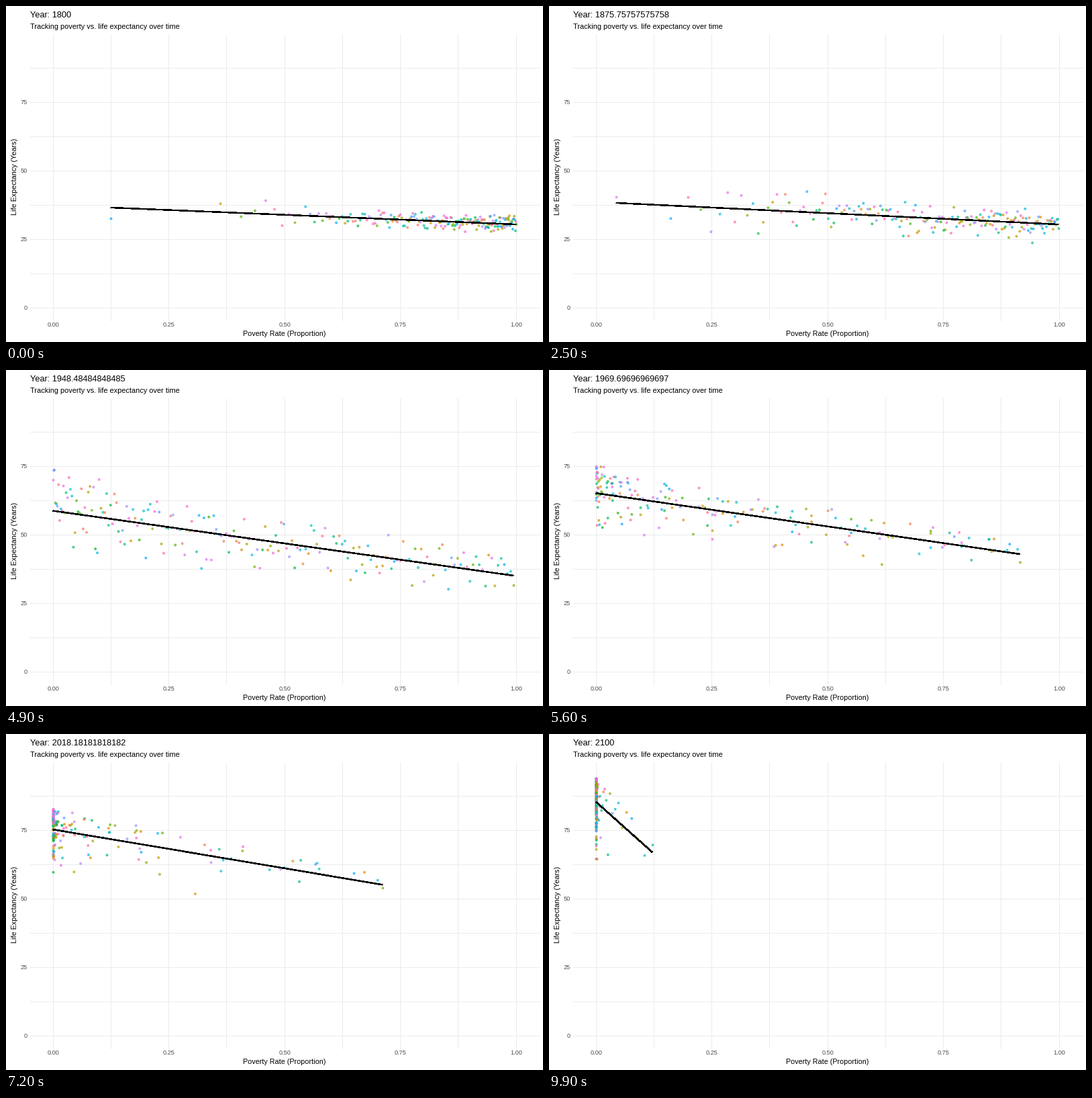
Animation, 800 px wide and 500 px high, one loop 10000 ms. Source, as a matplotlib script:

```python
import numpy as np
import matplotlib.pyplot as plt
from matplotlib.animation import FuncAnimation

W, H, DPI = 800, 500, 100
FRAMES, INTERVAL = 100, 100
N = 190
rng = np.random.default_rng(12)

plt.rcParams["font.family"] = "Liberation Sans"
plt.rcParams["toolbar"] = "None"

# Positions are in stage pixels, y pointing down.
T = np.arange(FRAMES)
KEYS = [0, 25, 39, 49, 63, 82, 99]


def tween(values):
    """Linear steps between the key times."""
    return np.interp(T, KEYS, values)[:, None]


LEFT = tween([156, 100, 76, 70, 70, 70, 70])
RIGHT = tween([760, 759, 757, 756, 655, 477, 154])
Y_LEFT = tween([300, 293, 270, 209.5, 157, 125.5, 101])
Y_RIGHT = tween([325, 325, 326, 306, 243, 207, 176])
# Poverty is rank ** POWER: most countries start poor, most end near zero.
POWER = np.exp(tween(np.log([.25, .4, .65, 1.3, 4.3, 12.3, 29])))
SPREAD = tween([12, 18, 25, 29, 22, 25, 26])


def drift(paths):
    return np.array([np.interp(T, KEYS, p) for p in paths]).T


def trend_y(x):
    return Y_LEFT + (Y_RIGHT - Y_LEFT) * (x - LEFT) / (RIGHT - LEFT)


def build():
    order = np.linspace(0, 1, N)[:, None]
    order = order + np.cumsum(rng.normal(0, .05, (N, len(KEYS))), axis=1)
    ranks = order.argsort(axis=0).argsort(axis=0) / (N - 1)
    share = drift(ranks) ** POWER
    x = LEFT + (RIGHT - LEFT) * share

    noise = rng.normal(0, .66, (N, len(KEYS)))
    z = np.clip(drift(.75 * rng.normal(size=(N, 1)) + noise), -2.2, 2.3)
    skew = .22 * np.clip((T[:, None] - 45) / 15, 0, 1)
    y = trend_y(x) + SPREAD * (1 - .5 * share) * (z + skew * (z * z - 1))

    # Wealthy countries pull ahead in the first half of the 20th century.
    ahead = np.exp(-((T[:, None] - 44) / 10) ** 2)
    y -= 35 * ahead * np.exp(-(x - 70) / 30)

    # Short-lived collapses in life expectancy.
    for i in rng.choice(N, 16, replace=False):
        when, depth = rng.uniform(3, 56), rng.uniform(40, 110)
        y[:, i] += depth * np.clip(1 - np.abs(T - when) / 2, 0, 1)
    return x, y


def hcl(frac, c=100, l=65):
    """Evenly spaced hues of polar CIE-LUV, as sRGB."""
    h = np.radians(15 + 360 * frac)
    u = c * np.cos(h) / (13 * l) + .1978
    v = c * np.sin(h) / (13 * l) + .4683
    y = ((l + 16) / 116) ** 3
    x = 9 * y * u / (4 * v)
    z = 3 * y / v - x / 3 - 5 * y
    m = np.array([[3.2405, -1.5371, -.4985],
                  [-.9693, 1.8760, .0416],
                  [.0556, -.2040, 1.0572]])
    rgb = np.clip(m @ np.array([x, np.full_like(x, y), z]), 0, 1)
    rgb = np.where(rgb > .0031308, 1.055 * rgb ** (1 / 2.4) - .055, 12.92 * rgb)
    return rgb.T


X, Y = build()
X_MIN, X_MAX = X.min(axis=1, keepdims=True), X.max(axis=1, keepdims=True)
LINE_X = np.hstack([X_MIN, X_MAX])
LINE_Y = trend_y(LINE_X)

fig = plt.figure(figsize=(W / DPI, H / DPI), dpi=DPI, facecolor="white")
ax = fig.add_axes([0, 0, 1, 1])
ax.set_xlim(0, W)
ax.set_ylim(H, 0)
ax.axis("off")


def pt(px):
    return px * 72 / DPI


def text(x, y, s, size, **kw):
    return ax.text(x, y, s, fontsize=pt(size), **kw)


grid = dict(color="#EBEBEB", lw=pt(1), antialiased=False, zorder=1)
tick = dict(size=9.2, color="#4D4D4D")
for i in range(9):
    gx = int(70 + 86.25 * i)
    ax.plot([gx, gx], [42, 468], **grid)
    if i % 2 == 0:
        text(gx + .5, 477, f"{i / 8:.2f}", ha="center", **tick)
for i in range(8):
    gy = 449 - 51 * i
    ax.plot([36, 795], [gy, gy], **grid)
    if i % 2 == 0:
        text(31.5, gy + 3.5, f"{i * 25 // 2}", ha="right", **tick)

title = text(36, 17, "", 12.75)
text(36, 34, "Tracking poverty vs. life expectancy over time", 11)
text(415, 491, "Poverty Rate (Proportion)", 10.7, ha="center")
text(18.5, 253.5, "Life Expectancy (Years)", 10.8, rotation=90,
     ha="right", va="center")

dots = ax.scatter(X[0], Y[0], s=pt(4) ** 2, c=hcl(rng.permutation(N) / N),
                  alpha=.7, linewidths=0, zorder=2)
trend, = ax.plot([], [], color="black", lw=pt(1.5), antialiased=False,
                 solid_capstyle="butt", zorder=3)


def draw(f):
    title.set_text(f"Year: {1800 + 300 * f / 99:.15g}")
    dots.set_offsets(np.column_stack([X[f], Y[f]]) + .5)
    trend.set_data(LINE_X[f], LINE_Y[f])
    return title, dots, trend


anim = FuncAnimation(fig, draw, frames=FRAMES, interval=INTERVAL,
                     repeat=True, repeat_delay=0, blit=False)
plt.show()
```
